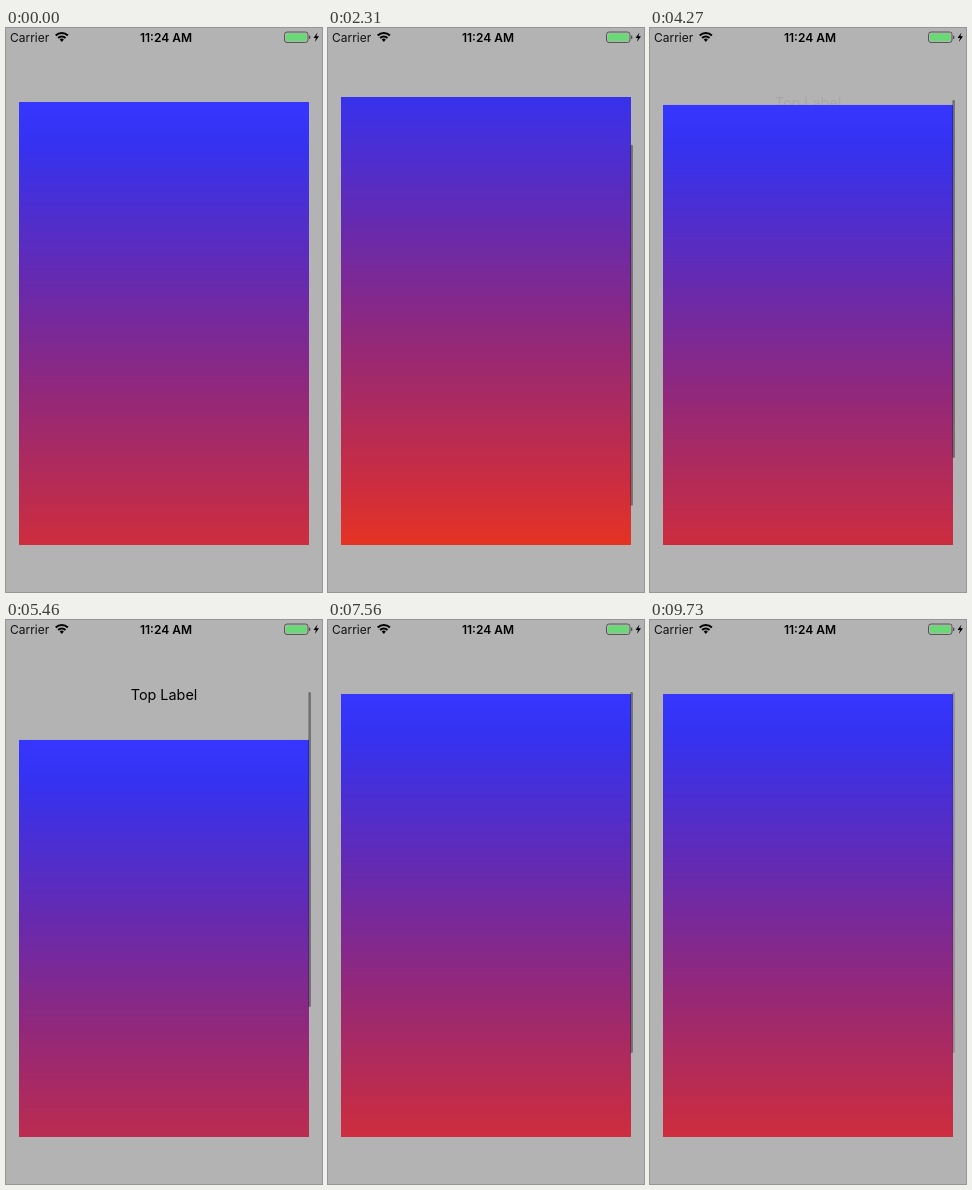
Animation, 316 px wide and 564 px high, one loop 9800 ms. Source, as an HTML page with a canvas:

```html
<!DOCTYPE html>
<html lang="en">
<head>
<meta charset="utf-8">
<style>
  html, body { margin: 0; width: 100%; height: 100%; overflow: hidden; background: #b3b3b3; }
  canvas { display: block; }
</style>
</head>
<body>
<canvas id="stage" width="316" height="564"></canvas>
<script>
const ctx = document.getElementById('stage').getContext('2d');
const LOOP = 9800;
const VIEW = { x: 13, y: 69, w: 290, h: 448 };
const PAD = 5, CARD = 538, MAX_SCROLL = 100;
const REVEAL = 41, TRIGGER = 46.5;

// [time in ms, scroll offset]; offsets outside 0..100 are rubber-banding
const KEYS = [
  [0, 0], [560, 0], [1000, -38], [1400, -40], [1800, 0], [2310, 55],
  [2590, 119], [2850, 138], [3140, 138], [3430, 105], [3640, 100], [3800, 92],
  [4250, 0], [4690, -47], [4970, -56], [5110, -56], [5460, -46], [5750, -5],
  [6090, 56], [6580, 114], [6780, 122], [6950, 110], [7180, 70], [7500, 0],
  [7750, 0], [8120, 104], [8190, 150], [8470, 176], [8620, 176], [8760, 106],
  [9000, 60], [9450, 0], [9800, 0]
];

const clamp = (v, lo, hi) => Math.min(hi, Math.max(lo, v));

const slope = i => (KEYS[i + 1][1] - KEYS[i][1]) / (KEYS[i + 1][0] - KEYS[i][0]);

// Flat at turning points, harmonic mean elsewhere, so the curve never overshoots
function tangent(i) {
  if (i === 0 || i === KEYS.length - 1) return 0;
  const a = slope(i - 1), b = slope(i);
  return a * b <= 0 ? 0 : 2 * a * b / (a + b);
}

function scrollAt(t) {
  let i = 0;
  while (i < KEYS.length - 2 && t >= KEYS[i + 1][0]) i++;
  const [t0, a] = KEYS[i], [t1, b] = KEYS[i + 1];
  const d = t1 - t0, u = (t - t0) / d, v = 1 - u;
  return v * v * (1 + 2 * u) * a + u * v * v * d * tangent(i)
       + u * u * (3 - 2 * u) * b - u * u * v * d * tangent(i + 1);
}

function pill(x, y, w, h, r, color) {
  ctx.fillStyle = color;
  ctx.beginPath();
  ctx.roundRect(x, y, w, h, r);
  ctx.fill();
}

function text(str, x, y, font, color, align = 'center') {
  ctx.font = font + ' Inter, sans-serif';
  ctx.fillStyle = color;
  ctx.textAlign = align;
  ctx.textBaseline = 'alphabetic';
  ctx.fillText(str, x, y);
}

function drawStatusBar() {
  text('Carrier', 4, 14, '12px', '#111', 'left');
  text('11:24 AM', 160, 14, '600 12px', '#000');

  ctx.strokeStyle = '#000';
  ctx.lineWidth = 2;
  for (const r of [5.2, 8.6]) {
    ctx.beginPath();
    ctx.arc(55.8, 13.6, r, -Math.PI * 0.75, -Math.PI * 0.25);
    ctx.stroke();
  }
  ctx.fillStyle = '#000';
  ctx.beginPath();
  ctx.moveTo(55.8, 14);
  ctx.arc(55.8, 13.6, 2.9, -Math.PI * 0.75, -Math.PI * 0.25);
  ctx.fill();

  ctx.strokeStyle = '#555';
  ctx.lineWidth = 1;
  ctx.beginPath();
  ctx.roundRect(278.5, 4, 23.5, 10.5, 2.5);
  ctx.stroke();
  pill(280, 5.5, 20.5, 7.5, 1.2, '#69d975');
  pill(303, 7.5, 1.3, 3.5, 0.6, '#555');

  ctx.fillStyle = '#000';
  ctx.fill(new Path2D('M311.5 4.5 L307.5 10 H310 L308.8 14 L313 8.3 H310.4 Z'));
}

function drawLabel(str, y, alpha, color, triggered) {
  if (alpha <= 0) return;
  ctx.globalAlpha = alpha;
  if (triggered) pill(93, y - 15, 130, 30, 15, '#fff');
  text(str, 158, y + 5, '14.4px', triggered ? '#000' : color);
  ctx.globalAlpha = 1;
}

function drawCard(scroll) {
  const top = VIEW.y + PAD - scroll;
  const fill = ctx.createLinearGradient(0, top, 0, top + CARD);
  fill.addColorStop(0, '#3636ff');
  fill.addColorStop(0.08, '#3532f0');
  fill.addColorStop(0.32, '#642ab2');
  fill.addColorStop(0.55, '#942878');
  fill.addColorStop(0.82, '#cd2d3e');
  fill.addColorStop(0.93, '#e63322');
  fill.addColorStop(1, '#f83500');
  const y0 = Math.max(VIEW.y, top);
  const y1 = Math.min(VIEW.y + VIEW.h, top + CARD);
  ctx.fillStyle = fill;
  ctx.fillRect(VIEW.x, y0, VIEW.w, y1 - y0);
}

function drawIndicator(scroll, over, t) {
  const alpha = Math.min(clamp((t - 540) / 60, 0, 1), clamp((LOOP + 50 - t) / 250, 0, 1));
  const length = 361 - over;
  const y = scroll > MAX_SCROLL ? 514 - length : 72 + 0.81 * Math.max(0, scroll);
  pill(302.4, y, 2.5, length, 1.25, `rgba(0,0,0,${0.38 * alpha})`);
}

function draw(t) {
  const scroll = scrollAt(t);
  const above = Math.max(0, -scroll);
  const below = Math.max(0, scroll - MAX_SCROLL);

  ctx.fillStyle = '#b3b3b3';
  ctx.fillRect(0, 0, 316, 564);
  drawLabel('Top Label', 75, Math.min(1, above / REVEAL), '#000', above > TRIGGER);
  drawCard(scroll);
  drawLabel('Bottom Label', 512 + Math.max(0, REVEAL - below),
    Math.min(1, below / REVEAL), '#fff', below > TRIGGER);
  drawIndicator(scroll, above + below, t);
  drawStatusBar();
}

function tick() {
  draw(performance.now() % LOOP);
  requestAnimationFrame(tick);
}
tick();
</script>
</body>
</html>
```
